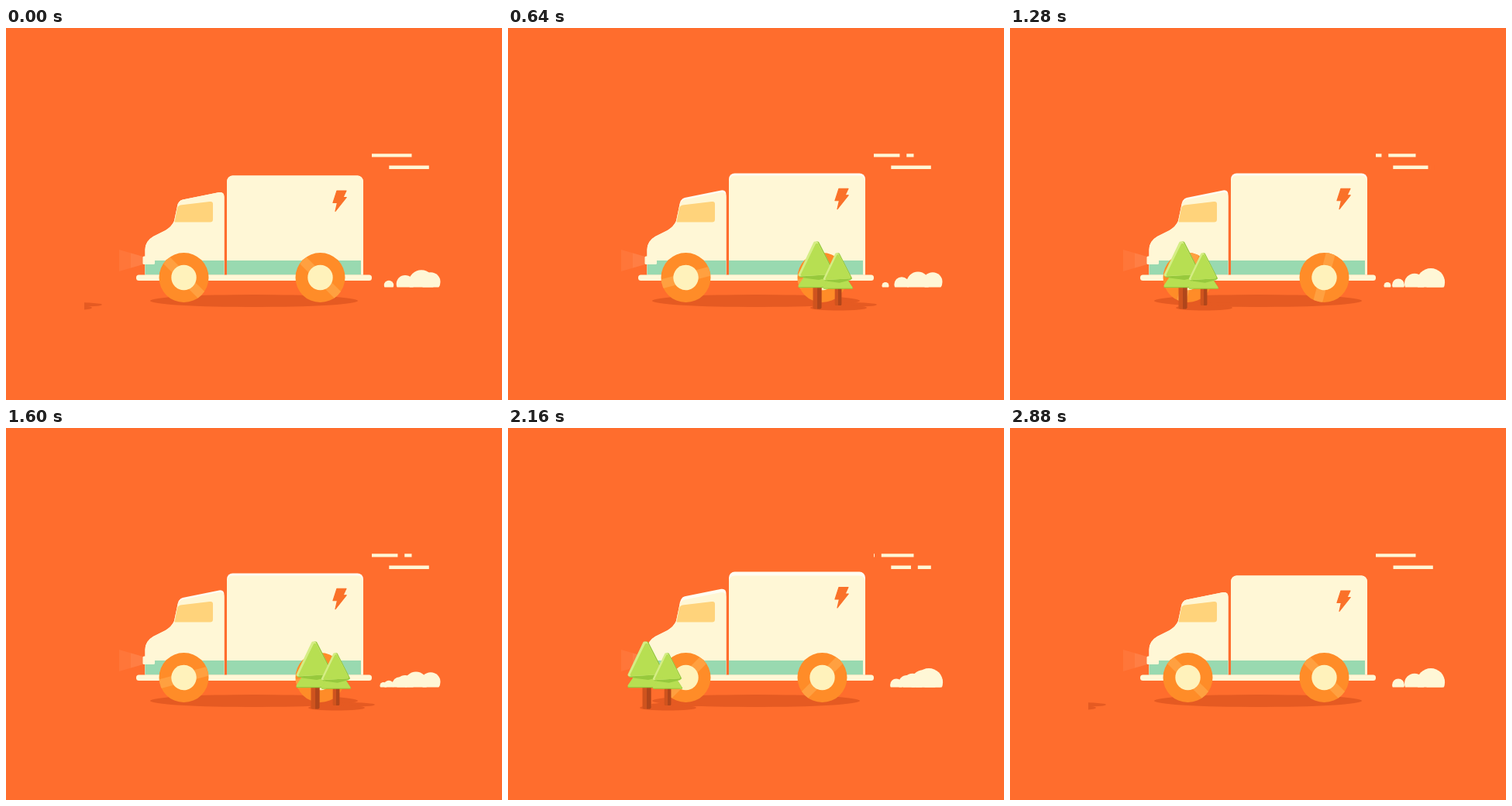
Animation of 640 by 480 pixels, one loop 2.96 s. Source, as an HTML page with a canvas:

```html
<!DOCTYPE html>
<html lang="en">
<head>
<meta charset="utf-8">
<title>Delivery truck</title>
<style>
  html, body { margin: 0; width: 100%; height: 100%; overflow: hidden; background: #ff6d2d; }
  canvas { display: block; }
</style>
</head>
<body>
<canvas id="stage" width="640" height="480"></canvas>
<script>
const ctx = document.getElementById('stage').getContext('2d');
const STEP_MS = 80, STEPS = 37;
const BG = '#ff6d2d', CREAM = '#fff7d6', GLOSS = '#fffdf2', MINT = '#99d9b0', SHADOW = '#e55a22';
const LEAF = '#b7df52', LEAF_DARK = '#97c93d', LEAF_LIGHT = '#d5ed85';
const FLOOR = 318.5;

function rect(color, x, y, w, h, radius = 0) {
  ctx.fillStyle = color;
  ctx.beginPath();
  ctx.roundRect(x, y, w, h, radius);
  ctx.fill();
}

function ellipse(color, x, y, rx, ry = rx) {
  ctx.fillStyle = color;
  ctx.beginPath();
  ctx.ellipse(x, y, rx, ry, 0, 0, Math.PI * 2);
  ctx.fill();
}

// A filled path whose corners are softened by a round outline.
function shape(color, path, soft = 0) {
  const p = new Path2D(path);
  ctx.fillStyle = ctx.strokeStyle = color;
  ctx.fill(p);
  ctx.lineJoin = 'round';
  ctx.lineWidth = soft;
  if (soft) ctx.stroke(p);
}

function placed(x, y, draw) {
  ctx.save();
  ctx.translate(x, y);
  draw();
  ctx.restore();
}

function clipped(x, y, w, h, draw) {
  ctx.save();
  ctx.beginPath();
  ctx.rect(x, y, w, h);
  ctx.clip();
  draw();
  ctx.restore();
}

// Cab and cargo box; only the roofs rise with the lift.
function body(color, lift) {
  const roof = 212 - lift * .85;
  shape(color, `M179.5 ${FLOOR}V286Q179.5 275 190 269L206 261Q214 256 217 249L221 230
    Q222 ${roof + 11} 228 ${roof + 9.5}L275 ${roof}Q281.5 ${roof - 1} 281.5 ${roof + 6}V${FLOOR}Z`);
  const top = 190.5 - lift;
  rect(color, 285, top, 176, FLOOR - top, [7.5, 7.5, 0, 0]);
}

function wheel(x, step) {
  placed(x, 322, () => {
    ellipse('#ff8c28', 0, 0, 32);
    ctx.clip();
    ctx.rotate(-(45 + 30 * step) * Math.PI / 180);
    rect('#ffa040', -6, -33, 12, 66);
    ellipse('#fff2bb', 0, 0, 16.2);
  });
}

function truck(step) {
  const lift = 5 * (1 - Math.abs(step % 6 / 3 - 1)) ** 1.2;
  ellipse(SHADOW, 320, 352, 134, 8);

  for (const reach of [31, 16]) {
    const spread = 5 + reach * .29;
    shape('rgba(255,235,200,.08)', `M177 295v10L${177 - reach} ${300 + spread}v${-2 * spread}Z`);
  }

  body(GLOSS, lift);
  body(CREAM, 0);
  rect(MINT, 179.5, 300, 102, 18.5);
  rect(MINT, 285, 300, 173, 18.5);
  rect(CREAM, 176.5, 294.5, 15.5, 10.5, 1.5);
  shape('#ffd37b', 'M221 232Q222 229 225 228.5L263 224Q267 223.5 267 227V247Q267 250.5 263.5 250.5H217.5Z');
  placed(427, 210 - lift * .9, () => shape('#fa7129', 'M0 0h12l-4 8.5h4.3L-2 26.5l2.5-11h-5.5Z', 1.2));
  rect(CREAM, 168, FLOOR, 304, 7.5, 3.5);
  wheel(229.5, step);
  wheel(405.5, step);
}

// A line with a short break that crosses it again and again after a delay.
function speedLine(x, y, step, speed, delay, period) {
  const gap = x - 8.8 + speed * ((step - delay) % period);
  rect(CREAM, x, y, 51.5, 4.3);
  clipped(x - 1, y - 1, 54, 7, () => rect(BG, gap, y - 1, 8.8, 7));
}

// Puffs grow as they drift off; two trains of them overlap mid-loop.
function puffs(step, first, last) {
  for (let born = first; born <= last; born += 3) {
    const age = step - born;
    if (age >= 0 && age <= 8) ellipse(CREAM, 487 + 7 * age, 332.5 - .55 * age, 4.5 + 1.7 * age);
  }
}

function dust(step) {
  clipped(470, 300, 92, 34.4, () => {
    ellipse(CREAM, 548, 327.7, 12.5);
    puffs(step, -7, 23);
    puffs(step, 16, 34);
  });
}

// One tier of branches: flat-topped or pointed, its left side hanging by sag.
function tier(color, x, top, bottom, topHalf, half, sag = 0, soft = 3) {
  shape(color, `M${x - topHalf} ${top}H${x + topHalf}L${x + half} ${bottom}L${x - half} ${bottom + sag}Z`, soft);
}

function tree(x, y, size) {
  placed(x, y, () => {
    ctx.scale(size, size);
    rect('#cf531e', -5.5, -2, 11, 29, 2);
    rect('#b0461b', 0, -2, 5.5, 29, [0, 0, 2, 0]);
    tier(LEAF_DARK, 0, -17, -1.8, 13, 23);
    tier(LEAF, -.5, -17, -3, 13, 22.5);
    shape(LEAF_DARK, 'M-17 -14L20 -16L2 -11.5Z', 2);
    tier(LEAF_DARK, 0, -58, -18, .5, 21, 2.5, 4);
    tier(LEAF_LIGHT, -2, -58, -19.5, 1, 20.5, 2.5, 4);
    tier(LEAF, -.3, -56, -19, .5, 19.5, 2);
  });
}

function trees(step) {
  const x = 47 + 44 * (step % 12);
  clipped(101, 260, 445, 110, () => {
    ellipse(SHADOW, x + 41, 357, 36, 3);
    ellipse(SHADOW, x + 27.5, 361, 36.5, 3.6);
    tree(x, 335.5, 1);
    tree(x + 27, 337, .78);
  });
}

function frame() {
  const step = Math.floor(performance.now() / STEP_MS) % STEPS;
  rect(BG, 0, 0, 640, 480);
  speedLine(472, 162.3, step, 6.5, 1.5, 12);
  speedLine(494.3, 177.6, step, 7.5, 8.8, 13.6);
  truck(step);
  dust(step);
  trees(step);
  requestAnimationFrame(frame);
}
frame();
</script>
</body>
</html>
```
